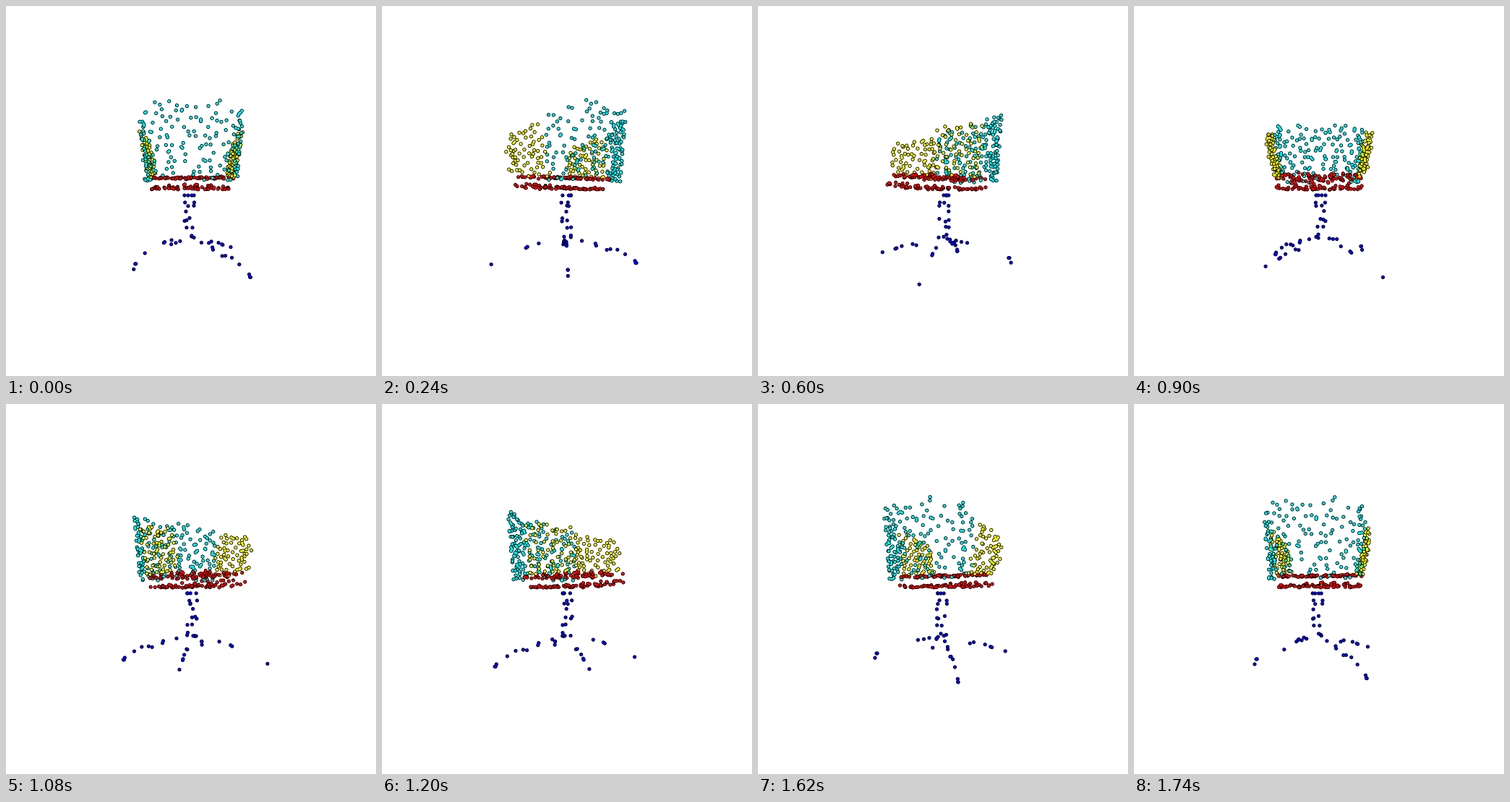
Animation, 512 px wide and 512 px high, one loop 1.8 s. Source, as a matplotlib script:

```python
import numpy as np
import matplotlib.pyplot as plt
from matplotlib.animation import FuncAnimation

SIZE, FRAMES, FOCAL = 512, 30, 443.4
CYAN, YELLOW, RED, BLUE = (0, 1, 1), (1, 1, 0), (1, 0, 0), (0, 0, 1)
HUB_X = -2
rng = np.random.default_rng(7)


def spread(n, jitter=0.03):
    """n roughly even points in the unit square."""
    k = np.arange(1, n + 1)[:, None]
    uv = k * [0.7548777, 0.5698403] + rng.random(2)
    return ((uv + rng.normal(0, jitter, (n, 2))) % 1).T


def polar(r, y, deg):
    """Points around the column; 0 deg is right, 90 deg is towards the viewer."""
    a = np.radians(deg)
    return np.column_stack([HUB_X + r * np.cos(a), y, r * np.sin(a)])


def squircle(a, n=2.6):
    c, s = np.cos(a), np.sin(a)
    return (np.sign(s) * np.abs(s) ** (2 / n), np.sign(c) * np.abs(c) ** (2 / n))


def backrest(n):
    u, v = spread(n)
    px, pz = squircle(np.linspace(-np.pi / 2, np.pi / 2, 400))
    px, pz = 63 * px, 22 + 49 * pz
    length = np.append(0, np.cumsum(np.hypot(np.diff(px), np.diff(pz))))
    d = u * length[-1]
    x, z = np.interp(d, length, px), np.interp(d, length, pz)
    top = 88 + 18 * np.clip((z - 22) / 34, 0, 1)
    y = 13 + (top - 13) * v
    shell = 1 + 0.025 * np.where(np.arange(n) % 2, 1, -1)
    flare = 0.93 + 0.1 * v
    return np.column_stack([x * shell * flare, y, z * shell * flare])


def armrest(n, side):
    u, v = spread(n)
    top = 86 - 11 * u - 13 * u ** 6
    y = 18 + (top - 18) * v
    x = 55.5 + 11.5 * (y - 18) / 62 + 2 * np.where(np.arange(n) % 2, 1, -1)
    return np.column_stack([side * x, y, 21 - 74 * u])


def seat(n):
    u, v = 2 * spread(3 * n) - 1
    keep = np.abs(u) ** 2.6 + np.abs(v) ** 2.6 < 1
    u, v = u[keep][:n], v[keep][:n]
    z = -9 + 67 * v
    top = 18 - 0.04 * z
    bottom = 3 + 7 * (np.maximum(-z, 0) / 75) ** 1.5
    y = np.where(np.arange(len(u)) % 2, top, bottom)
    return np.column_stack([60 * u, y + rng.normal(0, 0.7, len(u)), z])


def column():
    y = [6, 6, 6, 6, 16, 16, 20.5, 20.5, 28, 38, 41.5, 40, 50, 50, 61, 64, 64]
    deg = [180, 106, 65, 31, -20, 205, 106, -31, 135, -90, 190, 125,
           125, 55, 65, 30, -65]
    return polar(7, -np.array(y), deg)


# Star base: leg angle, then distance and drop of its points
LEGS = {
    136.5: ([17.5, 25, 33, 89, 88, 91], [67.5, 69, 70, 87, 87, 93]),
    43.5: ([22, 41, 42, 57, 62, 72, 83, 97, 98, 99],
           [69, 73, 76, 82, 81, 82, 88.5, 98, 101, 101]),
    225: ([37.5, 53, 55, 102], [72, 76.5, 78, 100]),
    315: ([40, 45.5, 62, 70, 72, 92], [76.5, 75, 78.7, 82, 83, 89]),
}
legs = [polar(np.array(r), -np.array(y), deg) for deg, (r, y) in LEGS.items()]

parts = [(backrest(172), CYAN), (armrest(64, -1), YELLOW),
         (armrest(64, 1), YELLOW), (seat(138), RED), (column(), BLUE)]
parts += [(leg, BLUE) for leg in legs]
points = np.vstack([p for p, _ in parts])
colors = np.vstack([np.tile(c, (len(p), 1)) for p, c in parts])

fig = plt.figure(figsize=(SIZE / 100, SIZE / 100), dpi=100, facecolor="white")
ax = fig.add_axes([0, 0, 1, 1])
ax.set(xlim=(0, SIZE), ylim=(SIZE, 0))
ax.axis("off")


def area(px):
    return (px * 72 / fig.dpi) ** 2


RIM, DOT = area(5.2), area(3.5)
dots = ax.scatter(np.zeros(2 * len(points)), np.zeros(2 * len(points)),
                  linewidths=0)


def draw(i):
    t = 2 * np.pi * i / FRAMES
    x, y, z = points.T
    depth = z * np.cos(t) - x * np.sin(t)
    scale = FOCAL / (FOCAL - depth)
    pos = np.column_stack([SIZE / 2 + (x * np.cos(t) + z * np.sin(t)) * scale,
                           SIZE / 2 - y * scale])
    # Within a depth slice all rims lie under all fills, so neighbours merge
    both = np.tile(np.arange(len(points)), 2)
    fill = np.repeat([0, 1], len(points))
    order = np.lexsort((depth[both], fill, np.floor(depth / 20)[both]))
    both, fill = both[order], fill[order]
    dots.set_offsets(pos[both])
    dots.set_sizes(np.where(fill, DOT, RIM))
    dots.set_facecolors(colors[both] * fill[:, None])
    return dots,


anim = FuncAnimation(fig, draw, frames=FRAMES, interval=60, repeat=True,
                     repeat_delay=0, blit=False)
plt.show()
```
